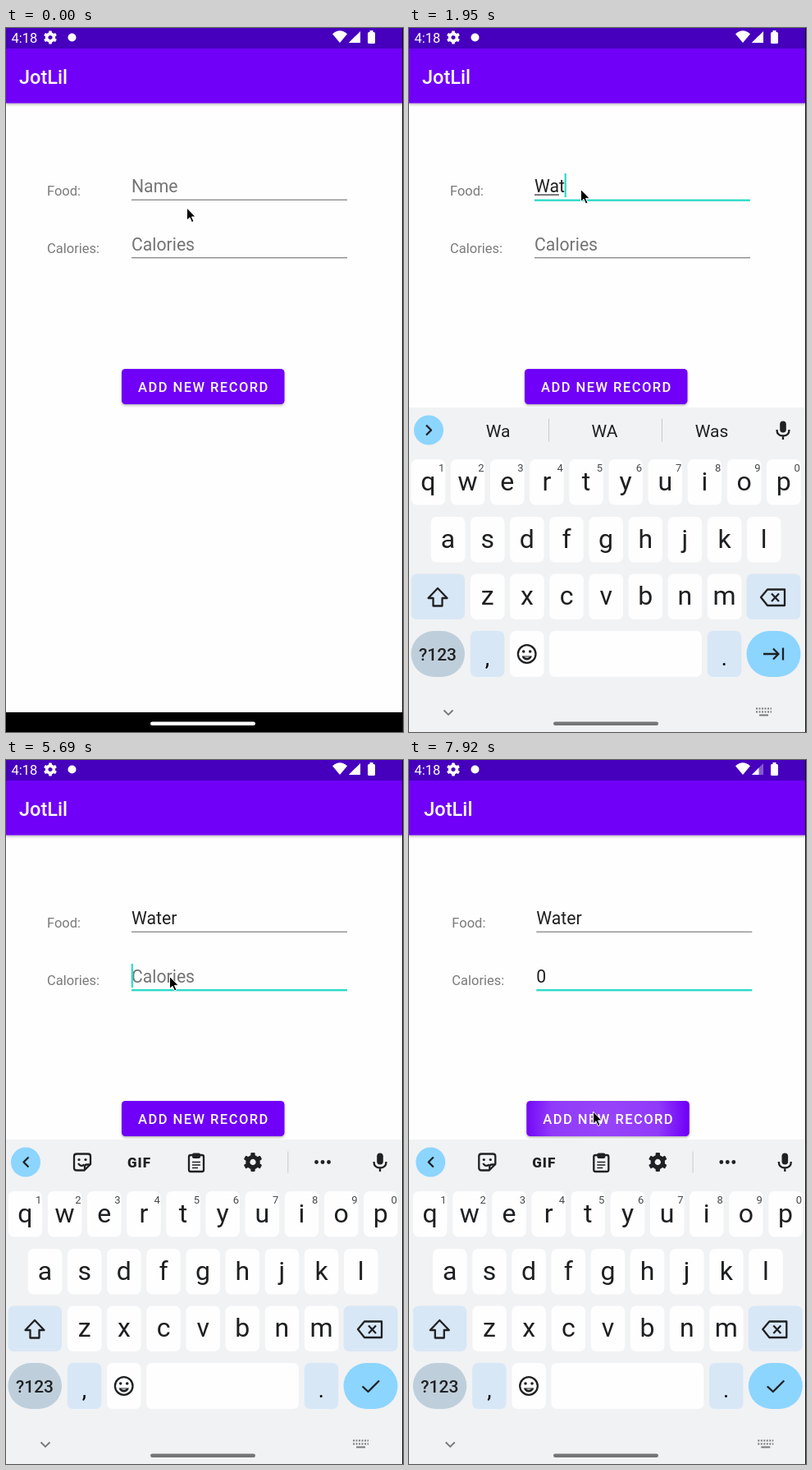
Write an HTML page that moves like this. It is 484x857 px and loops after 8 s.

```html
<!DOCTYPE html>
<html lang="en">
<head>
<meta charset="utf-8">
<title>Food record form</title>
<style>
  html, body { margin: 0; width: 100%; height: 100%; overflow: hidden; background: #fefefe; }
  svg { display: block; width: 484px; height: 857px; font-family: Roboto, sans-serif; }
  .mid { text-anchor: middle; }
  .label { font-size: 16.5px; fill: #7b7b7b; }
  .field { font-size: 21.2px; }
  .medium { font-weight: 500; fill: #fff; }
  .letter { font-size: 32px; fill: #1e1f21; }
  .hint { font-size: 13px; fill: #47484a; }
  .word { font-size: 21px; fill: #1f2022; }
  .line { fill: none; stroke: #1f2022; stroke-width: 2.3; stroke-linejoin: round; }
  .ink { fill: #1f2022; }
</style>
</head>
<body>
<svg id="stage" viewBox="0 0 484 857" xmlns="http://www.w3.org/2000/svg"></svg>
<script>
const LOOP = 8000;
const PURPLE = '#7000f7', TEAL = '#2fdac8', SKY = '#8cd5ff', PALE = '#d8e7f6', DARK = '#202124';

// Markup helpers
const rect = (x, y, w, h, fill, r = 0, extra = '') =>
  `<rect x="${x}" y="${y}" width="${w}" height="${h}" rx="${r}" fill="${fill}" ${extra}/>`;
const dot = (x, y, r, fill = DARK) => `<circle cx="${x}" cy="${y}" r="${r}" fill="${fill}"/>`;
const text = (x, y, cls, str, extra = '') => `<text x="${x}" y="${y}" class="${cls}" ${extra}>${str}</text>`;
const line = (d, extra = '') => `<path class="line" d="${d}" ${extra}/>`;
const group = (id, body) => `<g id="${id}">${body}</g>`;

function gear(x, y, scale, fill) {
  let teeth = '';
  for (let a = 0; a < 360; a += 60) teeth += rect(-2.6, -11.2, 5.2, 5.5, fill, 1, `transform="rotate(${a})"`);
  return `<g transform="translate(${x} ${y}) scale(${scale})">${teeth}
    <circle r="6.1" fill="none" stroke="${fill}" stroke-width="5"/></g>`;
}

function statusBar() {
  return rect(0, 0, 484, 25, '#4600bd') +
    text(6.5, 18, '', '4:18', 'font-size="16.5" fill="#fff"') +
    gear(54, 11.5, .72, '#fff') + dot(80.5, 11.5, 5, '#fff') +
    '<path fill="#fff" d="M398 7.3Q407 -.8 416 7.3L407 18Z"/>' +
    '<path id="signal" fill="#fff" d="M418 18L432 4V18Z"/>' +
    '<path fill="#fff" d="M418 18L426.5 9.5V18Z"/>' +
    rect(441, 5, 9, 14, '#fff', 1.5) + rect(443.5, 3, 4, 3, '#fff');
}

function form() {
  return text(16, 68, 'medium', 'JotLil', 'font-size="23.55"') +
    text(50, 204, 'label', 'Food:') + text(50, 274, 'label', 'Calories:') +
    '<rect id="bar0" x="153" width="263"/><rect id="bar1" x="153" width="263"/>' +
    text(153, 200, 'field', '', 'id="text0"') + text(153, 271, 'field', '', 'id="text1"') +
    rect(153, 202.4, 0, 1.3, '#333', 0, 'id="compose"') +
    rect(153, 177, 2.2, 29, TEAL, 0, 'id="caret"') +
    rect(141, 415, 198.5, 43, PURPLE, 4.5, 'filter="url(#lift)"') +
    rect(141, 415, 198.5, 43, 'url(#glow)', 4.5, 'id="ripple"') +
    text(161, 442.7, 'medium', 'ADD NEW RECORD', 'font-size="16.5" letter-spacing="1.47"');
}

function keyRow(letters, left, top, hints = '') {
  return [...letters].map((c, i) => {
    const x = left + i * 48.15;
    return rect(x, top, 41.5, 55.5, '#fefefe', 7) +
      text(x + 20.7, top + 37.5, 'letter mid', c) +
      (hints ? text(x + 37, top + 15, 'hint mid', hints[i]) : '');
  }).join('');
}

function keys() {
  const bottom = 734;
  return keyRow('qwertyuiop', 2.7, 525, '1234567890') +
    keyRow('asdfghjkl', 26.8, 595) + keyRow('zxcvbnm', 75, 664.5) +
    rect(2.5, 664.5, 65.5, 55.5, PALE, 7) + rect(411.5, 664.5, 66, 55.5, PALE, 7) +
    line('M35 682L23.5 694H29.5V703.5H40.5V694H46.5Z') +
    line('M429 693L437 683.5H458V703H437Z') + line('M442 688.5L451 698M451 688.5L442 698') +
    rect(2.5, bottom, 65.5, 56, '#becfdb', 28) +
    text(35, 770, 'mid', '?123', `font-size="21" font-weight="500" fill="${DARK}"`) +
    rect(74.8, bottom, 41.5, 56, PALE, 7) + text(95.5, 776, 'mid', ',', 'font-size="27"') +
    rect(123, bottom, 41.5, 56, '#fefefe', 7) +
    '<circle class="line" cx="143.7" cy="762" r="10.8"/>' + dot(139.7, 759, 1.8) + dot(147.7, 759, 1.8) +
    '<path class="ink" d="M137.5 764.5H150Q148.200 769.500 143.700 769.500T137.500 764.500Z"/>' +
    '<path fill="#fefefe" d="M140.500 765.500H147Q143.700 768 140.500 765.500Z"/>' +
    rect(171, bottom, 186, 56, '#fefefe', 7) +
    rect(363.700, bottom, 41.5, 56, PALE, 7) + text(384.3, 776, 'mid', '.', 'font-size="27"') +
    rect(411.5, bottom, 66, 56, SKY, 28) +
    group('next', line('M432 762H450M444 755.500L450.500 762L444 768.500M456 754.500V769.500')) +
    group('done', line('M434.500 762.500L441.500 769L455 755.500'));
}

function tools() {
  return line('M27.5 483.500L21.500 489.500L27.500 495.500') +
    line('M86 479.500H100Q103 479.500 103 482.500V492L95.500 499.500H86Q83 499.500 83 496.500V482.500Q83 479.500 86 479.500Z') +
    line('M103 492.500H98.500Q96 492.500 96 495V499') +
    line('M88 491Q91 496 95.500 492.500') + dot(89, 486.500, 1.6) + dot(97, 486.500, 1.6) +
    text(162.5, 495.5, 'mid', 'GIF', `font-size="17" font-weight="900" letter-spacing="1" fill="${DARK}"`) +
    '<rect class="line" x="223" y="481" width="18" height="20" rx="2"/>' +
    rect(227, 478.500, 10, 6.500, DARK, 2) +
    line('M227 489.500H237M227 493H237M227 496.500H234', 'style="stroke-width:1.7"') +
    gear(301, 489.5, 1.02, DARK) + rect(343.3, 476.500, 1, 26, '#c9cacc') +
    dot(378.5, 489.5, 2.4) + dot(386, 489.5, 2.4) + dot(393.5, 489.5, 2.4);
}

const drop = (x, y, s, turn) =>
  `<path transform="translate(${x} ${y}) rotate(${turn}) scale(${s})" fill="#3fb5ee" d="M0 -9C2 -4 5 -1 5 3A5 5 0 0 1 -5 3C-5 -1 -2 -4 0 -9Z"/>`;

function emojis() {
  return '<path fill="#1d85bd" d="M329 500Q328 479 344 479Q351 480 350 486Q342 482 341 489Q341 497 352 496V501H330Z"/>' +
    '<path fill="none" stroke="#79cdf2" stroke-width="2.500" d="M331 494Q332 481 345 480.500M336 498Q333 487 342 484"/>' +
    '<path fill="none" stroke="#d7f0fb" stroke-width="2" d="M344 479.500Q351 481 350 487M344 496Q348 499 352 496"/>' +
    drop(394, 484, .85, 125) + drop(405, 485, .95, 205) + drop(401, 497, .75, 75);
}

function words() {
  return line('M21 483.500L27 489.500L21 495.500') +
    [108.5, 238.5, 369].map((x, i) => text(x, 498, 'word mid', '', `id="word${i}"`)).join('') +
    rect(170, 475.500, 1, 28, '#c9cacc') + rect(308, 475.500, 1, 28, '#c9cacc') +
    group('emojis', rect(369, 475.500, 1, 28, '#c9cacc') + emojis());
}

function keyboard() {
  const mic = rect(452.200, 478.500, 7.6, 14, DARK, 3.8) +
    line('M448.500 489Q448.500 496.500 456 496.500T463.500 489M456 496.500V501');
  const nav = '<g fill="none" stroke="#77787a">' +
    '<path stroke-width="1.800" d="M42.500 830.500L48 836L53.500 830.500"/>' +
    '<path stroke-width="2" stroke-dasharray="2 1.500" d="M423 828.500H442M423 832.500H442"/>' +
    '<path stroke-width="2" d="M427 836.500H438"/></g>';
  return rect(0, 462, 484, 395, '#f1f2f4') +
    group('keys', dot(24, 489.5, 18, SKY) + group('tools', tools()) + group('words', words()) + mic + keys() + nav);
}

const stage = document.getElementById('stage');
stage.innerHTML = `<defs>
    <filter id="lift" x="-10%" y="-20%" width="120%" height="150%">
      <feDropShadow dx="0" dy="1.5" stdDeviation="1.5" flood-opacity=".3"/></filter>
    <radialGradient id="glow" gradientUnits="userSpaceOnUse" cx="237" cy="436" r="102">
      <stop offset="0" stop-color="#fff" stop-opacity=".27"/>
      <stop offset=".65" stop-color="#fff" stop-opacity=".23"/>
      <stop offset="1" stop-color="#fff" stop-opacity="0"/></radialGradient>
  </defs>` +
  rect(0, 0, 484, 857, '#fefefe') + rect(0, 25, 484, 66.5, PURPLE, 0, 'filter="url(#lift)"') + statusBar() +
  group('form', form()) + rect(0, 833, 484, 24, '#000') + group('keyboard', keyboard()) +
  rect(176, 844.5, 128, 4.6, '#fff', 2.3, 'id="pill"') + rect(483, 0, 1, 857, '#111') +
  '<path id="mouse" fill="#000" stroke="#fff" stroke-width="1" d="M0 0V15L3.500 11.800L6 17.500L8.500 16.400L6 10.900H10.700Z"/>';

const el = {};
stage.querySelectorAll('[id]').forEach(n => el[n.id] = n);

// Step tables: [start ms, value]
const steps = {
  mouse: [[0, [220.5, 219]], [150, [212, 201]], [300, [209.5, 196.500]], [2850, [203.5, 201]], [3000, [200, 213]],
    [3150, [198.5, 235]], [3300, [199, 255]], [3450, [199.5, 263.500]], [7030, [203, 292]], [7180, [213, 360]],
    [7330, [222, 417]], [7470, [224.5, 428]]],
  focus: [[0, -1], [300, 0], [3600, 1]],
  caret: [[0, 0], [300, 1], [900, 0], [1350, 1], [2850, 0], [3300, 1], [4200, 0], [4640, 1], [5090, 0],
    [5690, 1], [6130, 0], [6430, 1], [6880, 0], [7330, 1], [7770, 0]],
  rise: [[0, 400], [600, 160], [750, 0]],
  pill: [[0, '#fff'], [600, '#f4f4f4'], [750, '#e2e3e5'], [900, '#cdced0'], [1200, '#a3a4a6'], [1350, '#858688'], [1650, '#747577']],
  food: [[0, ''], [1650, 'W'], [1800, 'Wa'], [1950, 'Wat'], [2100, 'Wate'], [2250, 'Water']],
  compose: [[0, ''], [1800, 'W'], [1950, 'Wa'], [2100, 'Wat'], [2250, 'Wate'], [2400, 'Water'], [3600, '']],
  words: [[0, null], [1800, ['W', 'We', 'What']], [1950, ['Wa', 'WA', 'Was']], [2100, ['Wat', 'Watch', 'Water']],
    [2250, ['Wate', 'Water', 'Waters']], [2400, ['Water', 'Watermelon', '']], [3750, null]],
  calories: [[0, ''], [6430, '0']],
  done: [[0, 0], [3750, 1]],
  signal: [[0, 1], [6880, .35]],
  ripple: [[0, 0], [7770, .4], [7920, 1]],
  shift: [[0, 0], [7920, 2.3]],
};
const at = (name, t) => steps[name].findLast(s => s[0] <= t)[1];
const set = (id, attrs) => { for (const k in attrs) el[id].setAttribute(k, attrs[k]); };
const show = (id, on) => set(id, { visibility: on ? 'inherit' : 'hidden' });

function setField(i, value, placeholder, focused) {
  el['text' + i].textContent = value || placeholder;
  set('text' + i, { fill: value ? '#202020' : '#747474' });
  set('bar' + i, {
    y: (focused ? 208.500 : 208.600) + i * 70.5,
    height: focused ? 2.4 : 1.2,
    fill: focused ? TEAL : '#7c7c7c',
  });
}

function draw(t) {
  const food = at('food', t), calories = at('calories', t), focus = at('focus', t);
  setField(0, food, 'Name', focus === 0);
  setField(1, calories, 'Calories', focus === 1);

  const value = focus === 1 ? calories : food;
  const width = value ? el['text' + Math.max(focus, 0)].getComputedTextLength() : 0;
  set('caret', { x: 153 + width - .3, y: focus === 1 ? 248 : 177 });
  show('caret', at('caret', t));

  const composed = at('compose', t).length;
  set('compose', { width: composed ? el.text0.getSubStringLength(0, composed) : 0 });

  const list = at('words', t);
  show('tools', !list);
  show('words', list);
  show('emojis', list && !list[2]);
  if (list) list.forEach((w, i) => el['word' + i].textContent = w);

  const done = at('done', t), move = `translate(${at('shift', t)} 0)`;
  show('done', done);
  show('next', !done);
  set('form', { transform: move });
  set('keys', { transform: move });
  set('keyboard', { transform: `translate(0 ${at('rise', t)})` });
  set('pill', { fill: at('pill', t) });
  set('signal', { opacity: at('signal', t) });
  set('ripple', { opacity: at('ripple', t) });
  set('mouse', { transform: `translate(${at('mouse', t)})` });
}

const start = performance.now();
function tick() {
  draw((performance.now() - start) % LOOP);
  requestAnimationFrame(tick);
}
tick();
</script>
</body>
</html>
```
